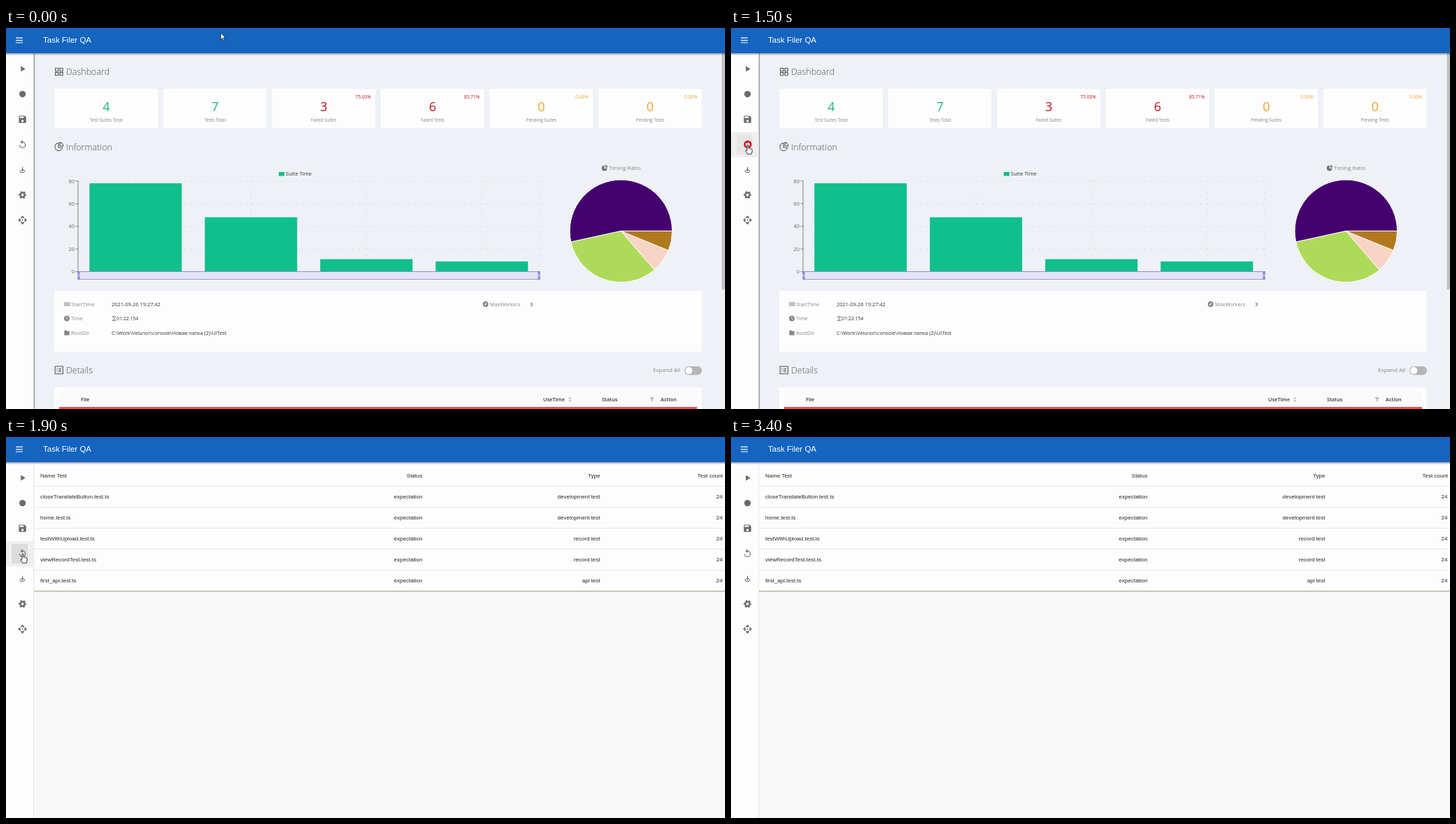
Write an HTML page that moves like this. It is 1028 by 545 pixels and loops after 4.2 s.

```html
<!DOCTYPE html>
<html lang="en">
<head>
<meta charset="utf-8">
<title>Test dashboard</title>
<style>
html, body { margin: 0; width: 100%; height: 100%; overflow: hidden; background: #f8f8f9; }
svg { display: block; width: 100%; height: 100%; }
text { font-family: "Open Sans", "Noto Sans", sans-serif; fill: #333; font-size: 7.4px; }
.arial text, text.arial { font-family: "Liberation Sans", Arial, sans-serif; font-size: 8px; fill: #262626; }
text.brand { font-size: 11.5px; fill: #fff; }
.title { font-size: 12.5px; font-weight: 300; fill: #555; }
.muted { fill: #868686; }
.bold { font-weight: 600; }
.count { font-size: 18px; font-weight: 500; }
.label { font-size: 6.3px; fill: #858585; }
.percent { font-size: 6.6px; }
.paper { fill: #fdfdfd; }
.outline { fill: none; stroke: #555; stroke-width: 1.1; }

.timed, #pointer { animation: 4.2s step-end infinite; }
#dashboard { animation-name: dashboard; }
#empty { animation-name: empty; }
#list { animation-name: list; }
#hover { animation-name: hover; }
#press { animation-name: press; }
#ring { animation-name: ring; }
#ripple { animation-name: ripple; }
#arrow { animation-name: arrow; }
#hand { animation-name: hover; }
#pointer { animation-name: travel; }

@keyframes dashboard { 0% { visibility: visible } 38.09%, 100% { visibility: hidden } }
@keyframes empty { 0% { visibility: hidden } 38.09% { visibility: visible } 40.47%, 100% { visibility: hidden } }
@keyframes list { 0% { visibility: hidden } 40.47%, 100% { visibility: visible } }
@keyframes hover { 0% { visibility: hidden } 16.66% { visibility: visible } 47.61%, 100% { visibility: hidden } }
@keyframes press { 0% { visibility: hidden } 38.09% { visibility: visible } 47.61%, 100% { visibility: hidden } }
@keyframes ring { 0% { visibility: hidden } 33.33% { visibility: visible } 40.47%, 100% { visibility: hidden } }
@keyframes ripple { 0% { opacity: 0 } 38.09% { opacity: 1 } 40.47% { opacity: .6 } 42.85% { opacity: .25 } 45.23%, 100% { opacity: 0 } }
@keyframes arrow {
  0% { visibility: visible } 16.66% { visibility: hidden }
  47.61% { visibility: visible } 80.95%, 100% { visibility: hidden }
}
@keyframes travel {
  0% { transform: translate(307px, 7px) }
  2.38% { transform: translate(290px, 25px) }
  4.76% { transform: translate(232px, 73px) }
  7.14% { transform: translate(160px, 122px) }
  9.52% { transform: translate(96px, 160px) }
  11.9% { transform: translate(50px, 184px) }
  14.28% { transform: translate(33px, 182px) }
  16.66% { transform: translate(30px, 176px) }
  19.04% { transform: translate(26px, 169px) }
  21.42% { transform: translate(24px, 167px) }
  47.61% { transform: translate(62px, 206px) }
  49.99% { transform: translate(165px, 240px) }
  52.38% { transform: translate(285px, 247px) }
  54.76% { transform: translate(400px, 232px) }
  57.14% { transform: translate(505px, 198px) }
  59.52% { transform: translate(579px, 159px) }
  61.9% { transform: translate(612px, 95px) }
  64.28% { transform: translate(638px, 58px) }
  66.66% { transform: translate(691px, 78px) }
  69.04% { transform: translate(655px, 106px) }
  71.42% { transform: translate(590px, 125px) }
  73.8% { transform: translate(540px, 127px) }
  76.18% { transform: translate(500px, 75px) }
  78.57%, 100% { transform: translate(447px, 9px) }
}
</style>
</head>
<body>
<svg viewBox="0 0 1028 545" preserveAspectRatio="none">
  <defs>
    <linearGradient id="shade" x2="0" y2="1">
      <stop stop-color="#445" stop-opacity=".5"/><stop offset="1" stop-color="#445" stop-opacity="0"/>
    </linearGradient>
  </defs>
  <rect width="1028" height="545" fill="#f8f8f9"/>

  <g id="empty" class="timed arial">
    <rect class="paper" x="40" y="36" width="988" height="35"/>
    <path d="M40 71.5H1028" stroke="#b3b3bf" stroke-width="1.4"/>
  </g>
  <g id="list" class="timed arial">
    <rect class="paper" x="40" y="36" width="988" height="184"/>
    <path d="M40 220.4H1028" stroke="#b4b59d" stroke-width="1.5"/>
  </g>

  <g id="dashboard" class="timed">
    <rect x="40" y="36" width="988" height="509" fill="#eef1f5"/>
    <rect x="1023.5" y="36" width="4.5" height="509" fill="#f1f1f1"/>
    <rect x="1023.5" y="36" width="4.5" height="338" fill="#c1c1c4"/>

    <path class="outline" d="M70.6 57.5h4.2v4.2h-4.2zM77 57.5h4.2v4.2H77zM70.6 63.6h4.2v4.2h-4.2zM77 63.6h4.2v4.2H77z"/>
    <text class="title" x="86" y="67">Dashboard</text>
    <g id="cards"></g>

    <path class="outline" d="M75 164.5A5.5 5.5 0 1 0 80.8 171H75zM77 163.6A5.3 5.3 0 0 1 81.8 168.8H77z"/>
    <text class="title" x="86" y="174.5">Information</text>

    <g id="chart"></g>
    <rect x="390" y="206" width="8" height="5.6" fill="#0fbf8c"/>
    <text x="400" y="210.7" style="font-size:7.6px">Suite Time</text>
    <rect x="103" y="348.5" width="660" height="11" fill="#e5e4f4" stroke="#8884d8" stroke-width=".8"/>
    <path d="M104 348v12M762 348v12" stroke="#8884d8" stroke-width="3"/>
    <path d="M104 352v4M762 352v4" stroke="#fff" stroke-width=".8"/>

    <path d="M855.5 196.5A4 4 0 1 0 859.7 200.8H855.5zM856.8 195.8A4 4 0 0 1 860.2 199.5H856.8z" fill="#777"/>
    <text class="muted" x="862" y="202.8" style="font-size:7.8px">Timing Ratio</text>
    <g id="pie" stroke="#fff" stroke-width=".9" stroke-linejoin="round"></g>

    <rect class="paper" x="69" y="376" width="925.5" height="87"/>
    <path d="M83.6 392v6M85.5 392v6M87.3 392v6M89 392v6M90.6 392v6" stroke="#888" stroke-width=".9"/>
    <circle cx="87" cy="415.5" r="4" fill="#888"/>
    <path d="M87 413v2.8l1.8 1" fill="none" stroke="#fff" stroke-width=".8"/>
    <path d="M83.3 432.6h3l1 1h3.4v5.8h-7.4z" fill="#888"/>
    <circle cx="685.7" cy="395" r="4" fill="#888"/>
    <path d="M683.8 397l1.2-2.6 2.6-1.3-1.2 2.6z" fill="#fff"/>
    <g class="muted-row">
      <text class="muted" x="93" y="398">StartTime</text>
      <text class="muted" x="93" y="418.3">Time</text>
      <text class="muted" x="93" y="438.6">RootDir</text>
      <text class="muted" x="692" y="398">MaxWorkers</text>
    </g>
    <text x="151" y="398">2021-09-26 19:27:42</text>
    <path d="M152 412.7h5M152 418.6h5M152.8 412.7c0 3 3.4 3 3.4 5.9M156.2 412.7c0 3-3.4 3-3.4 5.9" fill="none" stroke="#555" stroke-width=".7"/>
    <text x="158" y="418.3" style="font-size:6.9px;font-weight:500">01:22.154</text>
    <text x="151" y="438.6" style="font-size:7.2px">C:\Work\Velunor\console\Новая папка (2)\UITest</text>
    <text x="749" y="398">3</text>

    <path class="outline" d="M70.2 484h11.2v10.8H70.2zM75 487.2h4M75 489.5h4M75 491.8h4M72.5 487.2h1.1M72.5 489.5h1.1M72.5 491.8h1.1"/>
    <text class="title" x="86" y="494">Details</text>
    <text class="muted" x="925" y="492.2" style="font-size:8px">Expand All</text>
    <rect x="970" y="484" width="25" height="12.2" rx="6.1" fill="#b5b5b5"/>
    <circle cx="976.3" cy="490.1" r="5" fill="#fff"/>

    <rect class="paper" x="69" y="514" width="925.5" height="31"/>
    <rect x="76" y="519.5" width="912" height="23" fill="#fafafa"/>
    <rect x="76" y="542" width="912" height="3" fill="#ea504b"/>
    <g class="bold">
      <text x="107" y="533.8">File</text>
      <text x="768" y="533.8">UseTime</text>
      <text x="852" y="533.8">Status</text>
      <text x="936" y="533.8">Action</text>
    </g>
    <path d="M804 530.6l2.2-2.6 2.2 2.6zM804 532.4l2.2 2.6 2.2-2.6zM920.6 528.3h6.4l-2.3 3v3h-1.8v-3z" fill="#b5b5b5"/>
  </g>

  <rect class="paper" y="36" width="39.5" height="509"/>
  <path d="M39.7 36V545" stroke="#e6e6da" stroke-width=".9"/>
  <path class="timed" d="M40.5 36V545" stroke="#9c9f98" stroke-width="1.5" style="animation-name:dashboard"/>

  <g id="hover" class="timed">
    <rect y="149" width="39.5" height="36" fill="#efefef"/>
    <rect x="8" y="153" width="23" height="28" fill="#e6e6e6"/>
  </g>
  <rect id="press" class="timed" x="8" y="153" width="23" height="28" fill="#dcdcdc"/>
  <g id="ripple" class="timed">
    <circle cx="23.7" cy="166.6" r="14.6" fill="#bebebe"/>
    <circle cx="23.7" cy="166.6" r="10" fill="#a5a5a5"/>
  </g>
  <g id="menu" fill="#6a6a6a"></g>
  <circle id="ring" class="timed" cx="24" cy="166.6" r="4.4" fill="none" stroke="#e0101c" stroke-width="2.5"/>

  <rect y="36" width="1028" height="3.5" fill="url(#shade)"/>
  <rect width="1028" height="36" fill="#1464c0"/>
  <path d="M14 14.2h10M14 17.6h10M14 21h10" stroke="#fff" stroke-width="1.2"/>
  <text class="arial brand" x="53" y="21.3">Task Filer QA</text>

  <g id="pointer" stroke-linejoin="round">
    <path id="arrow" class="timed" d="M0 0V9.6L2.2 7.6 3.8 11 5.4 10.3 3.8 7H6.7z" fill="#fff" stroke="#222" stroke-width=".8"/>
    <path id="hand" class="timed" d="M-1 .8Q0-.6 1 .8V5Q2.2 4.2 2.8 5.4 4 4.8 4.5 5.9 6 5.5 6.2 7V10L5 13.4H-.2L-3 9Q-3.2 7.2-1 8.2z" fill="#fff" stroke="#222" stroke-width=".9"/>
  </g>
</svg>
<script>
const add = (id, markup) => document.getElementById(id).insertAdjacentHTML('beforeend', markup);
const text = (x, y, content, attrs = '') => `<text x="${x}" y="${y}" ${attrs}>${content}</text>`;
const line = (d, attrs) => `<path d="${d}" fill="none" ${attrs}/>`;
const end = 'text-anchor="end"';
const middle = 'text-anchor="middle"';

const green = '#1fb585', red = '#c0141f', amber = '#eea227';
[
  ['4', 'Test Suites Total', green, ''],
  ['7', 'Tests Total', green, ''],
  ['3', 'Failed Suites', red, '75.00%'],
  ['6', 'Failed Tests', red, '85.71%'],
  ['0', 'Pending Suites', amber, '0.00%'],
  ['0', 'Pending Tests', amber, '0.00%'],
].forEach(([count, label, color, percent], i) => {
  const x = 69.3 + i * 155.5;
  add('cards', `<rect class="paper" x="${x}" y="87" width="147.7" height="56.5"/>`
    + text(x + 74, 118.7, count, `class="count" ${middle} style="fill:${color}"`)
    + text(x + 74, 134.4, label, `class="label" ${middle}`)
    + text(x + 141.5, 101.4, percent, `class="percent" ${end} style="fill:${color}"`));
});

const times = [78, 48, 11, 9];
const base = 348.5, unit = 1.62;
const grid = 'stroke="#d6d9d9" stroke-width=".8" stroke-dasharray="2 6"';
const axis = 'stroke="#666" stroke-width=".8"';
for (let v = 0; v <= 80; v += 20) {
  const y = base - v * unit;
  add('chart', line(`M103 ${y}H763`, grid) + line(`M99.5 ${y}h3.5`, axis)
    + text(98, y + 2.7, v, `${end} class="muted" style="fill:#666"`));
}
add('chart', line('M763 219V348', grid) + line('M103 219V348.5H763', axis));
times.forEach((v, i) => {
  const x = 185.3 + i * 165;
  add('chart', line(`M${x} 219V348`, grid)
    + `<rect x="${x - 66}" y="${base - v * unit}" width="132" height="${v * unit}" fill="#0fbf8c"/>`);
});

const total = times.reduce((a, b) => a + b);
const rim = share => {
  const angle = share / total * 2 * Math.PI;
  return `${879.3 + 73.2 * Math.cos(angle)} ${290.4 - 73.2 * Math.sin(angle)}`;
};
let start = 0;
times.forEach((v, i) => {
  const color = ['#450070', '#addb59', '#f8d4c4', '#b0791e'][i];
  const large = v > total / 2 ? 1 : 0;
  add('pie', `<path d="M879.3 290.4L${rim(start)}A73.2 73.2 0 ${large} 0 ${rim(start + v)}z" fill="${color}"/>`);
  start += v;
});

const header = (id, statusX, typeX) => add(id, text(49, 57.6, 'Name Test')
  + text(statusX, 57.6, 'Status', end) + text(typeX, 57.6, 'Type', end)
  + text(1025, 57.6, 'Test count', end));
header('empty', 546.5, 734.5);
header('list', 595.5, 849.5);
[
  ['closeTranslateButton', 'development'],
  ['home', 'development'],
  ['testWithUpload', 'record'],
  ['viewRecordTest', 'record'],
  ['first_api', 'api'],
].forEach(([name, type], i) => {
  const y = 88.4 + i * 29.8;
  add('list', line(`M40 ${70.5 + i * 30}H1028`, 'stroke="#e1e1e1" stroke-width=".8"')
    + text(49, y, `${name}.test.ts`) + text(595.5, y, 'expectation', end)
    + text(849.5, y, `${type} test`, end) + text(1024.5, y, 24, end));
});

// Menu icons are drawn on a 24-unit grid, centred on the origin.
const fins = [0, 90, 180, 270]
  .map(a => `<path d="M0-6l2.1 2.1 2.5-2.5L0-11l-4.6 4.6 2.5 2.5z" transform="rotate(${a})"/>`).join('');
[
  '<path d="M-4-7V7L7 0z"/>',
  '<circle r="8"/>',
  '<path fill-rule="evenodd" d="M5-9H-7q-2 0-2 2V7q0 2 2 2H7q2 0 2-2V-5zM0 7a3 3 0 1 1 0-6 3 3 0 0 1 0 6zM3-3H-7v-4H3z"/>',
  '<path d="M0-7v-4l-5 5 5 5v-4a6 6 0 1 1-6 6h-2a8 8 0 1 0 8-8z"/>',
  '<path d="M0-7V2M-3.5-1L0 2.5 3.5-1M-6 1.5a6 5.5 0 0 0 12 0" fill="none" stroke="#6a6a6a" stroke-width="1.9"/>',
  '<g fill="none" stroke="#6a6a6a"><circle r="5.4" stroke-width="4"/><circle r="8" stroke-width="3" stroke-dasharray="4.2 4.178" stroke-dashoffset="2.1"/></g>',
  '<path d="M2 0L0 2-2 0 0-2z"/>' + fins,
].forEach((icon, i) => add('menu', `<g transform="translate(23.6 ${58.5 + i * 36.05}) scale(.58)">${icon}</g>`));
</script>
</body>
</html>
```
